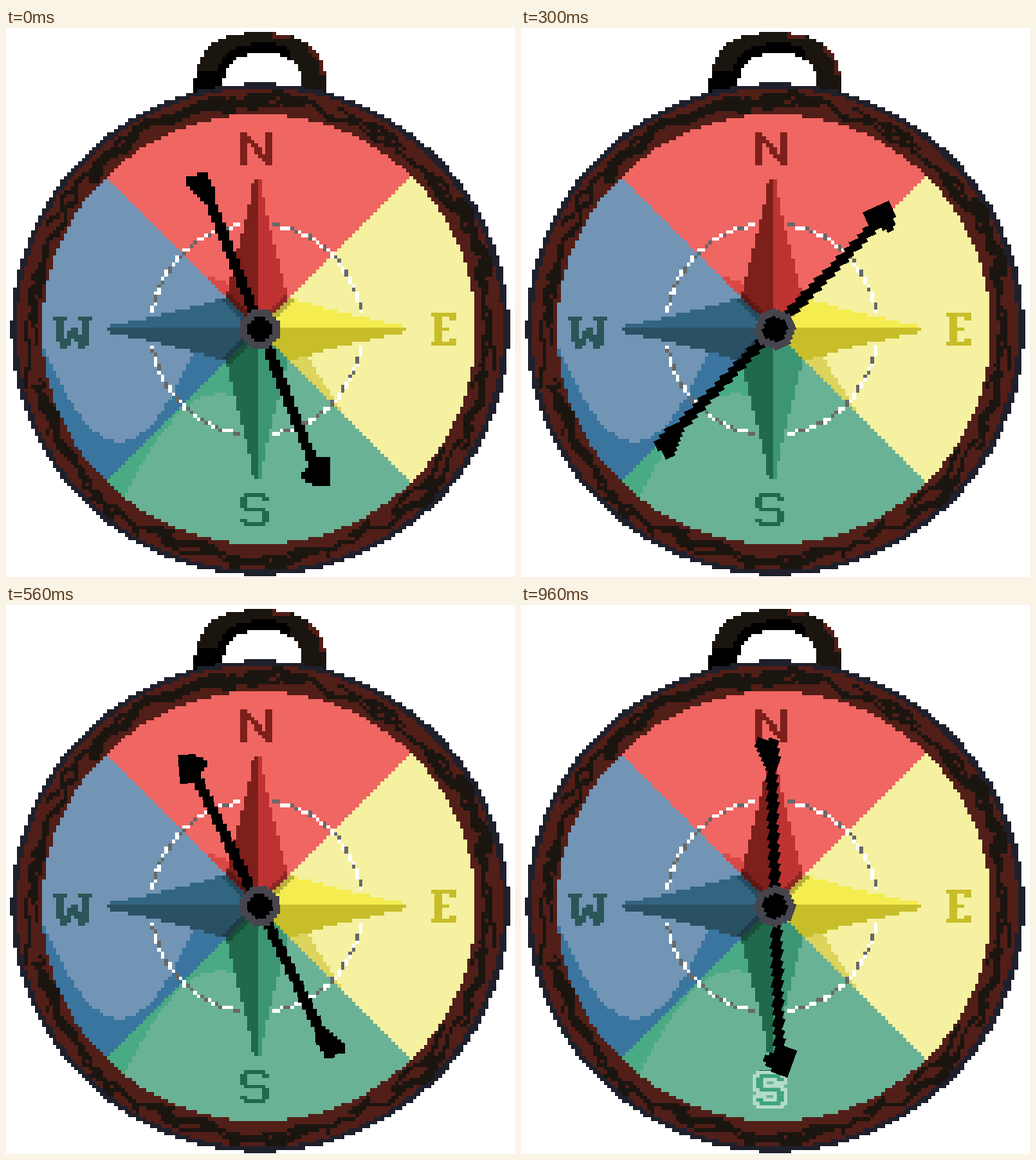
An HTML page with a canvas for the animation above (1 s loop, 650 by 700 pixels).

```html
<!DOCTYPE html>
<html lang="en">
<head>
<meta charset="utf-8">
<title>Compass</title>
<style>
  html, body { margin: 0; width: 100%; height: 100%; overflow: hidden; background: #fff; }
  canvas { display: block; width: 650px; height: 700px; }
</style>
</head>
<body>
<canvas id="stage" width="650" height="700"></canvas>
<script>
const U = 4.6, COLS = 142, ROWS = 153;     // art pixel size and grid
const PX = 70.5 * U, PY = 83.5 * U;        // needle pivot
const MX = 320.3, MY = PY;                 // middle of the rose
const ctx = document.getElementById('stage').getContext('2d');

const DIRS = {
  N: { face: '#f06662', light: '#be3331', dark: '#7d1f1a', ink: '#7d1f1a' },
  E: { face: '#f5f1a1', light: '#f5ec50', dark: '#c8be2a', ink: '#c8be2a' },
  S: { face: '#6ab295', light: '#3c9674', dark: '#206a4b', ink: '#206a4b' },
  W: { face: '#7295b5', light: '#326580', dark: '#2a5063', ink: '#2a5659' }
};

// Letters as strokes on a small grid, drawn with a pen two cells wide
const LETTERS = {
  N: { at: [65, 29], strokes: ['0,8 0,0 7,8 7,0'] },
  E: { at: [118, 79], strokes: ['0,0 5,0 5,1', '1,0 1,8', '1,4 3,4', '0,8 5,8 5,7'] },
  S: { at: [65, 129], strokes: ['6,1 5,0 1,0 0,1 0,3 1,4 5,4 6,5 6,7 5,8 1,8 0,7'] },
  W: { at: [13, 80], strokes: ['0,0 2,0', '7,0 9,0', '1,0 1,6 2,8 5,3 7,8 8,6 8,0'] }
};

const points = text => text.split(' ').map(s => s.split(',').map(Number));

function layer() {
  const c = document.createElement('canvas');
  c.width = COLS;
  c.height = ROWS;
  return c.getContext('2d');
}

// Fill every cell whose centre, in stage pixels, passes the test
function fill(g, color, test) {
  g.fillStyle = color;
  for (let j = 0; j < ROWS; j++)
    for (let i = 0; i < COLS; i++)
      if (test((i + 0.5) * U, (j + 0.5) * U)) g.fillRect(i, j, 1, 1);
}

const oval = (cx, cy, rx, ry, power = 2) => (x, y) =>
  Math.abs((x - cx) / rx) ** power + Math.abs((y - cy) / ry) ** power < 1;

function poly(g, color, text) {
  const p = points(text);
  fill(g, color, (x, y) => {
    let hit = false;
    p.forEach(([ax, ay], i) => {
      const [bx, by] = p[(i + 1) % p.length];
      if (ay > y !== by > y && x < (bx - ax) * (y - ay) / (by - ay) + ax) hit = !hit;
    });
    return hit;
  });
}

function letter(g, color, name, x0, y0, w = 1, h = 1) {
  g.fillStyle = color;
  for (const stroke of LETTERS[name].strokes) {
    const p = points(stroke);
    for (let i = 1; i < p.length; i++) {
      const [ax, ay] = p[i - 1], [bx, by] = p[i];
      const n = Math.max(Math.abs(bx - ax), Math.abs(by - ay));
      for (let k = 0; k <= n; k++) {
        const x = Math.round(ax + (bx - ax) * k / n), y = Math.round(ay + (by - ay) * k / n);
        g.fillRect(x0 + x * w, y0 + y * h, 2 * w, h);
      }
    }
  }
}

function seeded(seed) {
  return () => (seed = (seed * 16807) % 2147483647) / 2147483647;
}

function drawHandle(g) {
  const outer = oval(325, 80, 84, 74, 2.6), inset = oval(325, 80, 79, 69, 2.6);
  const shade = oval(328, 82, 62, 62, 2.5), hole = oval(328, 82, 51, 50, 2.5);
  const upper = (x, y) => y < 82;
  fill(g, '#1b1510', (x, y) => upper(x, y) && outer(x, y));
  fill(g, '#000', (x, y) => upper(x, y) && outer(x, y) && x < 365 && (shade(x, y) || x < 278 && y > 53));
  fill(g, '#521e18', (x, y) => outer(x, y) && !inset(x, y) && y < 58 && (x > 388 || x > 341 && x < 363));
  fill(g, '#fff', (x, y) => upper(x, y) && hole(x, y));
}

function drawWood(g) {
  fill(g, '#1e202c', oval(324.7, PY, 318, 313.5));
  fill(g, '#521e18', oval(324.3, PY, 310, 307));
  const rnd = seeded(11), strands = 46;
  g.fillStyle = '#1b1510';
  for (let s = 0; s < strands; s++) {
    const from = s / strands * 360 + rnd() * 6, span = 9 + rnd() * 15;
    const r0 = 283 + rnd() * 20, r1 = 283 + rnd() * 20;
    const thick = rnd() < 0.25 ? 2 : 1, phase = rnd() * 6;
    for (let k = 0; k <= 1; k += 0.02) {
      const a = (from + span * k) * Math.PI / 180;
      const r = r0 + (r1 - r0) * k + 4 * Math.sin(9 * k + phase);
      g.fillRect(Math.floor((PX + r * Math.cos(a)) / U), Math.floor((PY + r * Math.sin(a)) / U), thick, thick);
    }
  }
}

// Which quarter a point lies in
function quarter(x, y) {
  const dx = x - MX, dy = y - MY;
  if (Math.abs(dx) > Math.abs(dy)) return dx > 0 ? 'E' : 'W';
  return dy > 0 ? 'S' : 'N';
}

function drawFace(g) {
  const disc = oval(323, PY, 277, 274);
  const part = (dir, color, test = () => true) =>
    fill(g, color, (x, y) => disc(x, y) && quarter(x, y) === dir && test(x, y));
  for (const dir in DIRS) part(dir, DIRS[dir].face);

  // Deeper tones behind curved edges
  const down = (x, y) => x - MX + y - MY;    // distance past the rising diagonal
  const right = (x, y) => x - MX - y + MY;   // distance past the falling diagonal
  part('W', '#3a759f', (x, y) => y > Math.max(408, 527 - 0.013 * (x - 145) ** 2));
  part('S', '#4aaa84', (x, y) => x < 320 && down(x, y) < 8 + 0.009 * (x - 218) ** 2);
  part('E', '#ddd45e', (x, y) => y > 400 && right(x, y) < 0.62 * (433 - x));
  part('N', '#d94844', (x, y) => y > 308 && right(x, y) < 0.7 * (x - 252));
}

function drawRing(g) {
  const r = 135, steps = 190;
  for (let i = 0; i < steps; i++) {
    const a = i / steps * Math.PI * 2;
    const dx = r * Math.cos(a), dy = r * Math.sin(a);
    if (Math.min(Math.abs(dx), Math.abs(dy)) < 21) continue;
    g.fillStyle = i % 5 < 3 ? '#fff' : '#686868';
    g.fillRect(Math.floor((MX + dx) / U), Math.floor((MY + dy) / U), 1, 1);
  }
}

function drawStar(g) {
  const tip = 192;
  const ray = (x, y) => {
    const dx = Math.abs(x - MX), dy = Math.abs(y - MY), d = Math.max(dx, dy);
    return d < tip && Math.min(dx, dy) < 4 + 36 * ((tip - d) / 152) ** 1.15;
  };
  const lit = { N: x => x > MX, S: x => x > MX, E: (x, y) => y < MY, W: (x, y) => y < MY };
  for (const dir in DIRS)
    for (const tone of ['light', 'dark'])
      fill(g, DIRS[dir][tone], (x, y) =>
        quarter(x, y) === dir && ray(x, y) && lit[dir](x, y) === (tone === 'light'));

  // Shadow where neighbouring rays meet
  fill(g, 'rgba(0,0,0,.25)', (x, y) => {
    const dx = x - MX, dy = y - MY, a = Math.abs(dx), b = Math.abs(dy);
    return Math.abs(a - b) < 9 && Math.max(a, b) < 46 && ray(x, y) && !(dx > 0 && dy > 0);
  });
}

function drawBase() {
  const g = layer();
  drawHandle(g);
  drawWood(g);
  drawFace(g);
  drawRing(g);
  drawStar(g);
  for (const name in LETTERS) letter(g, DIRS[name].ink, name, ...LETTERS[name].at);
  return g.canvas;
}

function drawNeedle() {
  const g = layer();
  poly(g, '#000', '250,212 264,212 400,556 386,556');
  poly(g, '#000', '412,585 398,585 374,574 386,557 403,546 412,546');
  poly(g, '#000', '228,190 241,190 253,181 268,206 265,224 250,222 234,206');
  fill(g, '#46454d', oval(PX, PY, 5.4 * U, 5.4 * U));
  fill(g, '#000', oval(PX, PY, 3.4 * U, 3.4 * U));
  return g.canvas;
}

function drawGlow() {
  const w = 4.4, h = 48 / 11, x = 296 + w, y = 594 + h;
  for (let dy = -1; dy <= 1; dy++)
    for (let dx = -1; dx <= 1; dx++)
      letter(ctx, '#b4dccb', 'S', x + dx * w, y + dy * h, w, h);
  letter(ctx, '#3fa37c', 'S', x, y, w, h);
}

const base = drawBase(), needle = drawNeedle();
const easeInOut = u => u < 0.5 ? 2 * u * u : 1 - 2 * (1 - u) ** 2;

function render(ms) {
  // 30 steps per second on a 10 ms clock
  const step = Math.ceil(3 * (Math.floor(ms / 10) + 1) / 10) - 1;
  const u = Math.min(1, Math.max(0, (step - 3) / 21));
  ctx.setTransform(1, 0, 0, 1, 0, 0);
  ctx.imageSmoothingEnabled = false;
  ctx.fillStyle = '#fff';
  ctx.fillRect(0, 0, 650, 700);
  ctx.drawImage(base, 0, 0, COLS * U, ROWS * U);
  if (step >= 29) drawGlow();
  ctx.translate(PX, PY);
  ctx.rotate(-700 * easeInOut(u) * Math.PI / 180);
  ctx.drawImage(needle, -PX, -PY, COLS * U, ROWS * U);
}

const start = performance.now();
function tick() {
  render((performance.now() - start) % 1000);
  requestAnimationFrame(tick);
}
render(0);
requestAnimationFrame(tick);
</script>
</body>
</html>
```
